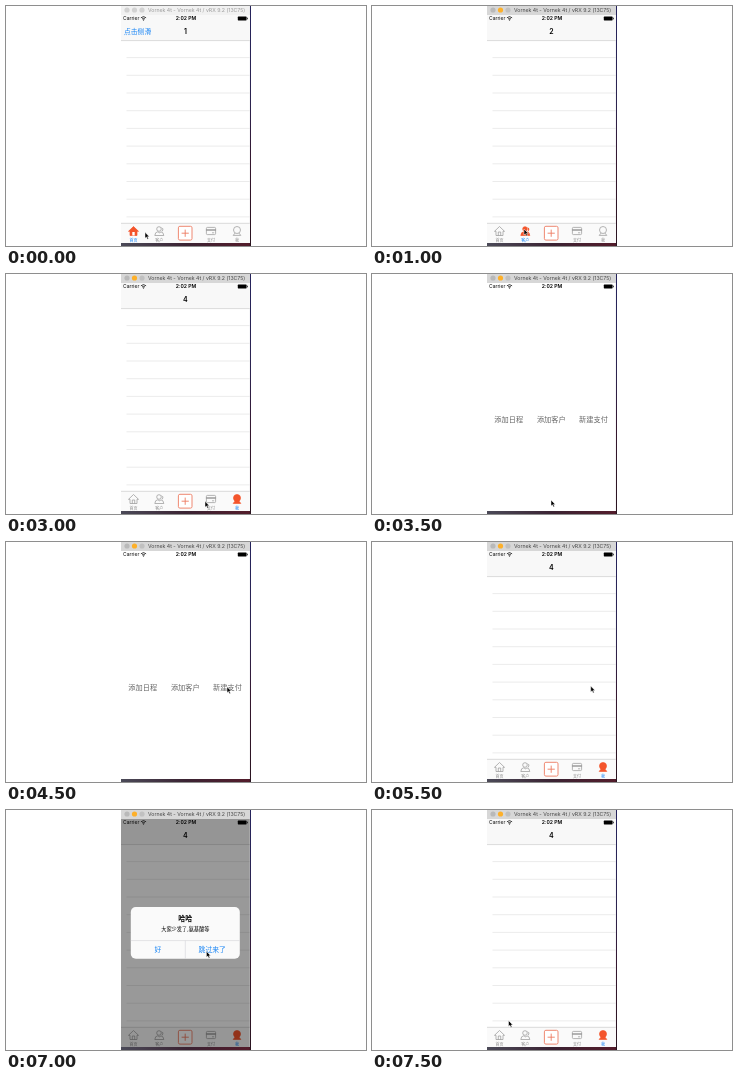
Write an HTML page that moves like this. It is 360 by 240 pixels and loops after 8 s.

```html
<!DOCTYPE html>
<html lang="en">
<head>
<meta charset="utf-8">
<style>
html, body { margin: 0; width: 100%; height: 100%; overflow: hidden; background: #fff; }
svg { display: block; width: 360px; height: 240px; }
text { font-family: Inter, Roboto, "Noto Sans CJK SC", "Noto Sans CJK", sans-serif; }
.mid { text-anchor: middle; }
.blue { fill: #1583f5; font-size: 6.8px; }
.line { stroke: #dedede; stroke-width: .6; }
.tab { fill: none; stroke: #969696; stroke-width: .7; stroke-linejoin: round; }
.tab text { fill: #8d8d8d; stroke: none; font-size: 4px; }
.tab.on { fill: #f4552c; stroke: #f4552c; }
.tab.on .hole { fill: #fff; stroke: none; }
.tab.on text { fill: #1583f5; }
#menu text { fill: #666; font-size: 7.2px; }
</style>
</head>
<body>
<svg viewBox="0 0 360 240">
  <defs>
    <linearGradient id="edge" x2="0" y2="1">
      <stop offset="0" stop-color="#25235c"/>
      <stop offset=".4" stop-color="#2c2450"/>
      <stop offset=".65" stop-color="#35172e"/>
      <stop offset="1" stop-color="#2a1420"/>
    </linearGradient>
    <linearGradient id="floor">
      <stop offset="0" stop-color="#4b4a58"/>
      <stop offset=".5" stop-color="#3b2333"/>
      <stop offset="1" stop-color="#541c2b"/>
    </linearGradient>
  </defs>
  <rect x="115" y="237" width="130" height="3" fill="url(#floor)"/>
  <rect x="243.8" width="1.2" height="240" fill="url(#edge)"/>

  <rect id="bar" x="115" width="128.8" height="9"/>
  <circle id="light1" cx="121" cy="4" r="2.6"/>
  <circle id="light2" cx="128.5" cy="4" r="2.6"/>
  <circle id="light3" cx="136" cy="4" r="2.6"/>
  <text id="caption" x="142" y="6" font-size="5.2">Vornek 4t - Vornek 4t / vRX 9.2 (13C75)</text>

  <rect x="115" y="9" width="128.8" height="228" fill="#fff"/>
  <g id="app">
    <rect x="115" y="9" width="128.8" height="25.5" fill="#f8f8f8"/>
    <path d="M115 34.6H243.8" stroke="#c6c6c6" stroke-width=".6"/>
    <text id="link" class="blue" x="118" y="27.7">点击侧滑</text>
    <text id="title" class="mid" x="179.4" y="28" font-size="7" font-weight="600"></text>
    <g id="rows" class="line"></g>
    <rect x="115" y="217.3" width="128.8" height="19.7" fill="#fafafa"/>
    <path d="M115 217.3H243.8" stroke="#c2c2c2" stroke-width=".6"/>
    <g class="tab" transform="translate(127.5 225)">
      <path d="M-5 .3L0-4.5L5 .3H3.5V4.5H-3.5V.3Z"/>
      <path class="hole" d="M-1.2 4.5V1H1.2V4.5"/>
      <text class="mid" y="10.5">首页</text>
    </g>
    <g class="tab" transform="translate(153.3 225)">
      <circle cx="-.3" cy="-2" r="2.3"/>
      <path d="M-4.5 4.5Q-4.2 .9-1.5 .8L.5 2L1.5 .8Q4.2 1 4.5 4.5Z"/>
      <path d="M2.4-3.4Q4.7-2.6 3 .3"/>
      <text class="mid" y="10.5">客户</text>
    </g>
    <g fill="none" stroke="#ee7c62" stroke-width=".9">
      <rect x="172.4" y="220.3" width="13.6" height="13.8" rx="1.5" fill="#fff"/>
      <path d="M175.6 227.2H182.8M179.2 223.6V230.8"/>
    </g>
    <g class="tab" transform="translate(205 225)">
      <rect x="-4.6" y="-3.6" width="9.2" height="7.2" rx="1"/>
      <path class="hole" d="M-4.6-1.5H4.6V-.5H-4.6Z"/>
      <path class="hole" d="M1 1.8H3.2"/>
      <text class="mid" y="10.5">支付</text>
    </g>
    <g class="tab" transform="translate(231 225)">
      <circle cy="-1" r="3.5"/>
      <path d="M-1.8 2L-3.8 4.4H3.8L1.8 2"/>
      <text class="mid" y="10.5">我</text>
    </g>
  </g>

  <g id="menu" class="mid">
    <text x="136.7" y="147.8">添加日程</text>
    <text x="179.3" y="147.8">添加客户</text>
    <text x="221.5" y="147.8">新建支付</text>
  </g>

  <g id="status">
    <text x="117" y="14.3" font-size="5">Carrier</text>
    <g fill="none" stroke="#111" stroke-width=".8">
      <path d="M134.9 11.8Q137.5 9.4 140.1 11.8M136 13Q137.5 11.7 139 13"/>
      <circle cx="137.5" cy="14" r=".3"/>
    </g>
    <text class="mid" x="180" y="14.3" font-size="5.1" font-weight="600">2:02 PM</text>
    <rect x="231.8" y="10.6" width="8.8" height="3.8" rx=".6"/>
    <rect x="241" y="11.7" width=".7" height="1.6"/>
  </g>

  <g id="alert">
    <rect x="115" y="9" width="128.8" height="228" opacity=".4"/>
    <rect x="124.8" y="97" width="109" height="51.8" rx="5" fill="#fafafa"/>
    <path d="M124.8 130.6H233.8M179.3 130.6V148.8" stroke="#d4d4d8" stroke-width=".6"/>
    <text class="mid" x="179.3" y="111.3" font-size="7" font-weight="600">哈哈</text>
    <text class="mid" x="179.3" y="121.3" font-size="5.2">大家少发了,氨基酸等</text>
    <text class="mid blue" x="152" y="142.4">好</text>
    <text class="mid blue" x="206.2" y="142.4">跳过来了</text>
  </g>

  <path id="cursor" d="M0 0V6L1.4 4.8L2.4 7L3.5 6.5L2.5 4.4H4.3Z" stroke="#fff" stroke-width=".5"/>
</svg>
<script>
const STEP = 500;
// page, cursor x, cursor y, layer on top
const steps = [
  [1, 139, 226.3], [1, 149, 224],
  [2, 152, 223], [2, 178, 224],
  [3, 204, 224], [4, 230, 224], [4, 199, 227.3],
  [4, 179, 226, "menu"], [4, 205, 170, "menu"],
  [4, 221, 144.7, "menu"], [4, 221, 144.7, "menu"],
  [4, 218.7, 144],
  [4, 218.7, 144, "alert"], [4, 210, 143, "alert"], [4, 200.4, 141.3, "alert"],
  [4, 136.5, 210.5]
];

const get = id => document.getElementById(id);
const show = (id, on) => { get(id).style.display = on ? "" : "none"; };
const fill = (id, color) => get(id).setAttribute("fill", color);
const tabs = [...document.querySelectorAll(".tab")];

get("rows").innerHTML = Array.from({ length: 10 }, (_, i) =>
  `<path d="M120.5 ${51.6 + i * 17.7}H243.8"/>`).join("");

function draw(index) {
  const [page, x, y, layer] = steps[index];
  const active = index > 0;
  fill("bar", active ? "#d7d7d7" : "#f1f1f1");
  fill("caption", active ? "#444" : "#999");
  fill("light1", active ? "#b9b9b9" : "#d2d2d2");
  fill("light2", active ? "#fdb02a" : "#d2d2d2");
  fill("light3", active ? "#c0c0c0" : "#d2d2d2");
  get("title").textContent = page;
  tabs.forEach((tab, i) => tab.classList.toggle("on", i === page - 1));
  show("link", page === 1);
  show("app", layer !== "menu");
  show("menu", layer === "menu");
  show("alert", layer === "alert");
  get("cursor").setAttribute("transform", `translate(${x} ${y})`);
}

let shown = -1;
const start = performance.now();
function tick() {
  const index = Math.floor((performance.now() - start) / STEP) % steps.length;
  if (index !== shown) draw(shown = index);
  requestAnimationFrame(tick);
}
tick();
</script>
</body>
</html>
```
